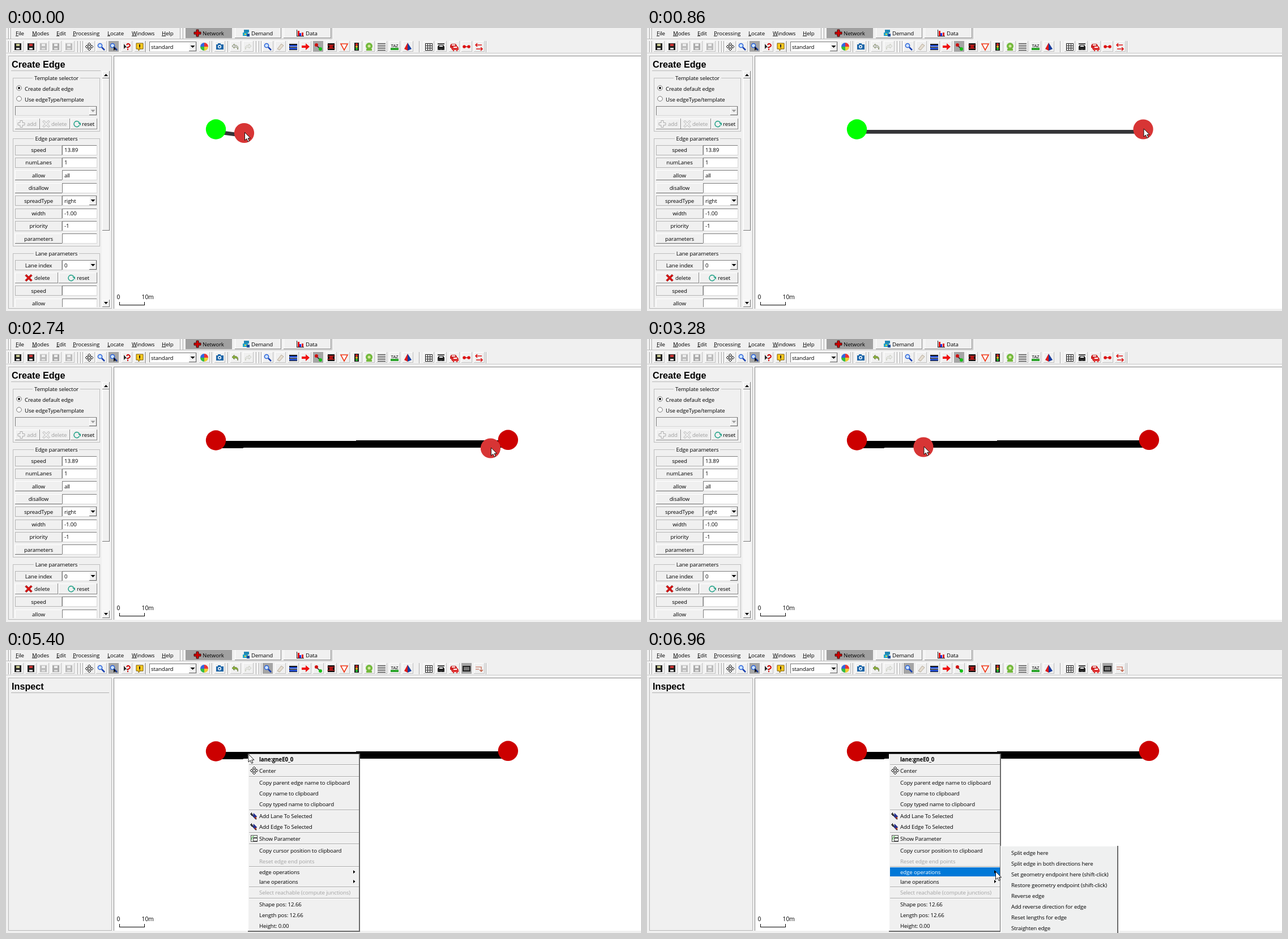
Write an HTML page that moves like this. It is 1121 px wide and 500 px high and loops after 8 s.

```html
<!DOCTYPE html>
<html lang="en">
<head>
<meta charset="utf-8">
<title>Network editor</title>
<style>
html, body { margin: 0; width: 100%; height: 100%; overflow: hidden; background: #f0f0f0; }
svg { display: block; width: 1121px; height: 500px; }
text { font: 9.7px "Open Sans", "Noto Sans", sans-serif; letter-spacing: -.13px; white-space: pre; }
.title { font: bold 16.2px "Liberation Sans", Arial, sans-serif; letter-spacing: 0; }
.bold { font-weight: 700; }
.scale { font-size: 10.3px; letter-spacing: 0; }
.key { text-decoration: underline; }
rect, .crisp { shape-rendering: crispEdges; }
</style>
</head>
<body>
<svg id="stage" viewBox="0 0 1121 500"></svg>
<script>
const LOOP = 8000, CLICK = 2420, INSPECT = 4380, PRESS = 5160, MENU = 5320, SUBMENU = 6340;
const START = [370.5, 179];

// ---- drawing helpers ----
const box = (x, y, w, h, fill, more = '') => `<rect x="${x}" y="${y}" width="${w}" height="${h}" fill="${fill}" ${more}/>`;
const path = (d, fill, stroke = 'none', sw = 1) => `<path d="${d}" fill="${fill}" stroke="${stroke}" stroke-width="${sw}"/>`;
const dot = (x, y, r, fill, more = '') => `<circle cx="${x}" cy="${y}" r="${r}" fill="${fill}" ${more}/>`;
const text = (x, y, s, fill = '#000', more = '') => `<text x="${x}" y="${y + 3.5}" fill="${fill}" ${more}>${s}</text>`;
const mid = (x, y, s, fill) => text(x, y, s, fill, 'text-anchor="middle"');
const at = (x, y, s) => `<g transform="translate(${x} ${y})">${s}</g>`;
const group = (id, s) => `<g id="${id}">${s}</g>`;

const raised = (x, y, w, h, edge = '#8a8a8a', fill = '#f0f0f0') =>
  box(x, y, w, h, edge) + box(x, y, w - 1, h - 1, '#fff') + box(x + 1, y + 1, w - 2, h - 2, fill);
const flat = (x, y, w, h) => box(x, y, w, h, '#b4b4b4') + box(x + 1, y + 1, w - 2, h - 2, '#f0f0f0');
const field = (x, y, w, h, fill = '#fff') =>
  box(x, y, w, h, '#d8d8d8') + box(x, y, w - 1, h - 1, '#7c7c7c') + box(x + 1, y + 1, w - 2, h - 2, fill);
const down = (x, y, fill = '#000') => path(`M${x - 4} ${y - 2}h8l-4 4z`, fill);
const combo = (x, y, w, h, off) => field(x, y, w, h, off ? '#f0f0f0' : '#fff') +
  raised(x + w - 14, y + 1, 13, h - 2, '#666') + down(x + w - 7.5, y + h / 2, off ? '#999' : '#000');
const vline = (x, y, h) => box(x, y, 1, h, '#a5a5a5') + box(x + 1, y, 1, h, '#fff');
const frame = (y, h, name, half) =>
  `<rect x="12.5" y="${y + .5}" width="153" height="${h}" fill="none" stroke="#bdbdbd"/>` +
  box(89 - half, y - 5, half * 2, 10, '#f0f0f0') + mid(89, y, name);

// ---- icons, centred on 0,0 ----
const floppy = (c, label) => box(-6, -6, 12, 12, c) + box(-3, -5, 6, 4, label) + box(-3, 2, 6, 3, '#ddd');
const lens = path('M1 1L6 6', 'none', '#1840b0', 2.5) + dot(-2, -2, 3.6, '#cfe6ff', 'stroke="#2860d8" stroke-width="1.5"');
const move = path('M0-7L3-4H1V-1H4V-3L7 0 4 3V1H1V4H3L0 7-3 4H-1V1H-4V3L-7 0-4-3V-1H-1V-4H-3z', '#fff', '#222', 1);
const plus = (c, line) => path('M-2-6H2V-2H6V2H2V6H-2V2H-6V-2H-2z', c, line);
const cross = (c, line) => path('M-6-4L-4-6 0-2 4-6 6-4 2 0 6 4 4 6 0 2-4 6-6 4-2 0z', c, line);
const cycle = path('M4.5-2A5 5 0 1 0 4.6 2', 'none', '#2aa58c', 1.6) + path('M2-2H7V3z', '#2aa58c');
const back = c => path('M-6-1L-2-5V-2.6C3-3 6 0 4 5 4 1 1 .4-2 .8V3z', c, '#5b6b3a', .7);
const car = c => path('M-6 4V0L-4-3H4L6 0V4H4V6H2V4H-2V6H-4V4z', c) + box(-3, -2, 6, 2, '#fff');
const sheet = c => box(-6, -6, 12, 2, c) + box(-6, 4, 12, 2, c);
const wand = path('M-5-4L5 6', 'none', '#222', 2) + path('M0-5L6 1 3 6-1 1z', '#26308f') + path('M-6-3H-1M-3.5-6V0', 'none', '#222') + box(2, 2, 3, 3, '#a33a1c');
const wheel = ['#e33', '#ec3', '#3b4', '#36d'].map((c, i) => `<path d="M0 0V-7A7 7 0 0 1 7 0z" fill="${c}" transform="rotate(${i * 90})"/>`).join('');
const swap = c => path('M-6-3H5M-3-6L-6-3-3 0M6 4H-5M3 1L6 4 3 7', 'none', c, 1.5);

const tools = [
  [21, floppy('#222', '#c8c890')], [44, floppy('#222', '#c33')],
  [66, floppy('#bbb', '#eee')], [88, floppy('#aaa', '#eee')], [111, floppy('#bbb', '#eee')],
  [147, move], [168, lens], [190, lens + path('M0-1V7L2 5 5 6z', '#111'), 1],
  [213, path('M-5-5V4L-2 1 1 2z', '#222') + path('M0-3Q2-7 5-4T2 1V3', 'none', '#c00', 2) + box(1, 4, 2, 2, '#c00')],
  [236, path('M-6-6H6V4H1L-2 7V4H-6z', '#ffcb1f', '#7a5a00') + box(-1, -4, 2, 5, '#222') + box(-1, 2, 2, 1, '#222')],
  [350, wheel],
  [377, box(-6, -4, 13, 9, '#1b65a8') + box(-3, -6, 5, 2, '#1b65a8') + dot(0, 0, 3, '#fff') + dot(0, 0, 1.6, '#1b65a8')],
  [484, path('M-5 4L2-5 6-2-1 6z', '#e5ddd0', '#b5aa9a')],
  [507, box(-7, -5, 14, 11, '#111') + box(-7, -3, 14, 3, '#2952d0') + box(-7, 2, 14, 3, '#2952d0') + path('M-6 .5H7', 'none', '#fff', .8)],
  [529, path('M-7-2H0V-6L7 0 0 6V2H-7z', '#f01010')],
  [574, box(-6, -6, 12, 12, '#111') + box(-3, -3, 6, 6, '#b01010') + path('M-7-3H7M-7 3H7', 'none', '#d33', 1)],
  [597, path('M-6-5H6L0 6z', '#fff', '#f03a1a', 1.6)],
  [619, box(-4, -7, 8, 14, '#222') + dot(0, -4, 2, '#e22') + dot(0, 0, 2, '#eb2') + dot(0, 4, 2, '#2c3')],
  [641, dot(0, -1, 6, '#72b93b') + dot(0, -1, 2.5, '#d5e8a0') + box(-5, 4, 10, 3, '#72b93b')],
  [663, [-6, -3, 0, 3, 6].map(y => box(-7, y, 14, 1, '#222')).join('')],
  [686, box(-7, 2, 14, 4, '#2da52d') + `<text y="1" text-anchor="middle" style="font-size:8px">TAZ</text>`],
  [709, path('M0-7L7 4 0 7z', '#173e9e') + path('M0-7L-6 4 0 7z', '#e01818')],
  [746, [-6, -2, 2, 6].map(v => box(-6, v, 13, 1, '#222') + box(v, -6, 1, 13, '#222')).join('')],
  [768, sheet('#444') + car('#222')], [791, at(-1, -2, car('#c22')) + at(2, 2, car('#d33'))],
];

const toolButton = ([x, icon, on]) =>
  (on ? box(x - 9, 23, 18, 19, '#a5a5a5') : raised(x - 9, 23, 19, 19, '#c0c0c0')) + at(x, 33, icon);

const menus = [[17, 'File'], [46, 'Modes'], [89, 'Edit'], [118, 'Processing'], [179, 'Locate'], [222, 'Windows'], [275, 'Help']];

function chrome() {
  const modes = box(317, 0, 82, 18, '#a0a0a0') + raised(404, -2, 82, 20) + raised(490, -2, 84, 20) +
    at(338, 9, plus('#d00000', '#3a0a0a')) + text(347, 9, 'Network') +
    at(424, 9, box(-4, -6, 9, 5, '#2187b5') + box(-6, -1, 9, 6, '#23a6c8') + box(1, 1, 5, 5, '#1c4f9c') + box(-3, 1, 3, 2, '#e8d040')) + text(433, 9, 'Demand') +
    at(519, 9, box(-6, -6, 1, 12, '#222') + box(-6, 5, 13, 1, '#222') + box(-4, -4, 3, 9, '#e01010') + box(-1, 0, 3, 5, '#1030e0') + box(3, -1, 3, 6, '#e01010')) + text(529, 9, 'Data');
  return box(0, 0, 1121, 500, '#f0f0f0') +
    box(0, 19, 575, 1, '#b8b8b8') + box(0, 20, 575, 1, '#fff') + box(0, 44, 1121, 1, '#c4c4c4') + box(0, 45, 1121, 1, '#fff') +
    [4, 8, 307, 312, 575].map(x => vline(x, 0, 19)).join('') +
    [4, 8, 126, 131, 135, 246, 363, 391, 441, 446, 450, 729, 847].map(x => vline(x, 23, 20)).join('') +
    menus.map(([x, s]) => text(x, 9, `<tspan class="key">${s[0]}</tspan>${s.slice(1)}`)).join('') + modes +
    tools.map(toolButton).join('') +
    combo(253, 24, 84, 18) + text(256, 33, 'standard') +
    raised(396, 23, 19, 19, '#c0c0c0') + raised(418, 23, 19, 19, '#c0c0c0') +
    group('undoOff', at(405, 33, back('#d8d8d8'))) + group('undoOn', at(405, 33, back('#8bb13a'))) +
    `<g transform="translate(427 33) scale(-1 1)" opacity=".35">${back('#ddd')}</g>` +
    box(190, 49, 931, 447, '#8a8a8a') + box(191, 50, 930, 446, '#fff') +
    `<rect x="4.5" y="49.5" width="182" height="446" fill="none" stroke="#b5b5b5"/>`;
}

const edgeIcon = path('M-4-3L4 4', 'none', '#222', 1.6) + dot(-3, -3, 3, '#d01010') + dot(4, 4, 3, '#18c018');

function row(y, name, value, kind) {
  const top = Math.round(y - 9);
  return (kind == 'button' ? raised(16, top, 84, 18, '#6c6c6c') : flat(16, top, 83, 18)) + mid(57.5, y, name) +
    (kind == 'combo' ? combo : field)(99, top, 62, 18) + text(103, y, value);
}

const edgeRows = [['speed', '13.89'], ['numLanes', '1'], ['allow', 'all', 'button'], ['disallow', '', 'button'],
  ['spreadType', 'right', 'combo'], ['width', '-1.00'], ['priority', '-1'], ['parameters', '', 'button']];
const radio = (y, on) => dot(23, y, 4.3, '#fff', 'stroke="#777"') + (on ? dot(23, y, 1.9, '#000') : '');

function createPanel() {
  return `<g clip-path="url(#panelClip)">` +
    text(10, 66.5, 'Create Edge', '#000', 'class="title"') + box(9, 75, 158, 1, '#b8b8b8') +
    frame(88, 94, 'Template selector', 42) + radio(106, 1) + text(33, 107, 'Create default edge') +
    radio(125) + text(33, 126, 'Use edgeType/template') + combo(16, 138, 145, 17, 1) +
    raised(16, 160, 44, 19) + at(27, 169.5, plus('#f4f4f4', '#aaa')) + text(37, 169.5, 'add', '#a0a0a0') +
    raised(60, 160, 53, 19) + at(71, 169.5, cross('#f4f4f4', '#aaa')) + text(80, 169.5, 'delete', '#a0a0a0') +
    raised(114, 160, 47, 19) + at(125, 169.5, cycle) + text(134, 169.5, 'reset') +
    frame(195, 190, 'Edge parameters', 40) + edgeRows.map((r, i) => row(215.5 + 22.4 * i, ...r)).join('') +
    frame(398, 130, 'Lane parameters', 40) + row(419, 'Lane index', '0', 'combo') +
    raised(16, 432, 76, 19) + at(40, 441.5, cross('#e01010', '#900')) + text(50, 441.5, 'delete') +
    raised(93, 432, 68, 19) + at(115, 441.5, cycle) + text(125, 441.5, 'reset') +
    row(464, 'speed', '') + row(486.5, 'allow', '', 'button') +
    box(169, 76, 14, 417, '#f7f7f7') + raised(170, 76, 13, 13, '#777') + raised(170, 89, 13, 269, '#777') + raised(170, 480, 13, 13, '#777') +
    path('M173 85h7l-3.5-4z', '#000') + path('M173 484h7l-3.5 4z', '#000') + '</g>' +
    toolButton([462, lens]) + toolButton([551, edgeIcon, 1]) +
    toolButton([813, path('M-5 0H5', 'none', '#c11', 1.5) + dot(-4, 0, 2.8, '#d11') + dot(4, 0, 2.8, '#d11')]) + toolButton([835, swap('#d11')]);
}

function inspectPanel() {
  return text(10, 66.5, 'Inspect', '#000', 'class="title"') + box(9, 75, 173, 1, '#b0b0b0') +
    toolButton([462, lens, 1]) + toolButton([551, edgeIcon]) +
    toolButton([813, box(-7, -5, 14, 10, '#222') + box(-5, -3, 10, 6, '#777'), 1]) +
    toolButton([835, path('M-6-3H4V5M1 2L4 5 7 2M-6 1H0', 'none', '#c0593f', 1.2)]);
}

// y, label, kind: '' live, 'off' greyed, 'info' not selectable, 'sub' opens a submenu
const items = [
  [193, 'lane:gneE0_0', 'info'], [213, 'Center', ''],
  [234, 'Copy parent edge name to clipboard', ''], [253, 'Copy name to clipboard', ''], [272, 'Copy typed name to clipboard', ''],
  [293, 'Add Lane To Selected', ''], [312, 'Add Edge To Selected', ''], [333, 'Show Parameter', ''],
  [354, 'Copy cursor position to clipboard', ''], [373, 'Reset edge end points', 'off'],
  [392, 'edge operations', 'sub'], [409, 'lane operations', 'sub'],
  [428, 'Select reachable (compute junctions)', 'off'],
  [449, 'Shape pos: 12.66', 'info'], [468, 'Length pos: 12.66', 'info'], [487, 'Height: 0.00', 'info'],
];
const subItems = ['Split edge here', 'Split edge in both directions here', 'Set geometry endpoint here (shift-click)',
  'Restore geometry endpoint (shift-click)', 'Reverse edge', 'Add reverse direction for edge', 'Reset lengths for edge', 'Straighten edge'];

function contextMenu() {
  return box(427, 183, 198, 315, '#696969') + box(427, 183, 196, 313, '#fff') + box(428, 184, 195, 312, '#f0f0f0') + box(427, 183, 197, 1, '#555') +
    [202, 223, 282, 322, 342, 382, 418, 438].map(y => box(429, y, 194, 1, '#a8a8a8') + box(429, y + 1, 194, 1, '#fff')).join('') +
    '<rect id="hot" x="429" width="194" fill="#0078d7"/>' +
    items.map(([y, s, kind], i) => text(447, y, s, kind == 'off' ? '#a3a3a3' : '#000', `id="item${i}"` + (i ? '' : ' class="bold"')) +
      (kind == 'sub' ? path(`M613 ${y - 3}v6l3.5-3z`, '#000') : '')).join('') +
    at(438, 213, move) + at(437, 293, wand) + at(437, 312, wand) +
    at(438, 333, box(-6, -6, 12, 12, '#555') + box(-5, -5, 10, 10, '#e8f4e8') + box(-2, -2, 8, 7, '#444') + box(-1, 0, 6, 4, '#fff') + path('M-5 2L-3-3 0-4', 'none', '#3a3'));
}

const subMenu = box(624, 346, 208, 160, '#696969') + box(624, 346, 206, 160, '#fff') + box(625, 347, 205, 160, '#eff0f0') +
  subItems.map((s, i) => text(643, 358 + 19.1 * i, s)).join('');

document.getElementById('stage').innerHTML =
  '<clipPath id="panelClip"><rect x="4" y="49" width="183" height="444"/></clipPath>' +
  '<clipPath id="viewClip"><rect x="191" y="50" width="930" height="446"/></clipPath>' +
  chrome() + group('create', createPanel()) + group('inspect', inspectPanel()) +
  text(195.5, 475.5, '0', '#000', 'class="scale"') + text(239.5, 475.5, '10m', '#000', 'class="scale"') +
  '<path class="crisp" d="M200.5 484V489.5H244.5V484" fill="none" stroke="#000"/>' +
  '<g clip-path="url(#viewClip)"><line id="draft" stroke="#343437" stroke-width="6.6"/>' +
  '<path id="lane" class="crisp" d="M371 180H618V179H886V192H419V193H371Z"/>' +
  dot(...START, 17.7, '#0f0', 'id="from"') + dot(886.3, 178.3, 17.7, '#c00', 'id="to"') +
  dot(0, 0, 17.6, '#d73535', 'id="ghost"') + '</g>' +
  group('menu', contextMenu()) + group('sub', subMenu) +
  dot(427, 184, 10, '#ff0', 'id="press" opacity=".47"') +
  '<path id="arrow" d="M0 0V14L3.3 11 5.6 16.2 7.9 15.2 5.7 10.2H10Z" fill="#fff" stroke="#000" stroke-width=".9"/>';

// ---- pointer motion: start, ms per step, steps, points on a smooth curve ----
const moves = [
  [80, 77, 8, [420.5, 185.5], [560, 193], [745, 196], [872.3, 187]],
  [780, 80, 5, [872.3, 187], [873, 184], [876, 179], [879, 178], [881, 177], [882.3, 176.7]],
  [1420, 80, 1, [882.3, 176.7], [882, 177.4]],
  [1560, 80, 3, [882, 177.4], [884.3, 181]],
  [2040, 80, 1, [884.3, 181], [885.3, 180]],
  [2200, 80, 1, [885.3, 180], [887, 178]],
  [2660, 77.5, 9, [887, 178], [820, 199.5], [610, 201], [488, 191]],
  [3600, 80, 7, [488, 191], [468, 168], [430, 115], [399, 56], [392, 27], [394, 42], [401, 97], [424, 126]],
  [4220, 80, 1, [424, 126], [425, 127]],
  [4540, 80, 5, [425, 127], [439, 152], [427, 185]],
  [5560, 75, 9, [427, 185], [504, 326], [592.5, 386], [611, 394]],
  [6420, 80, 1, [611, 394], [616, 395]],
  [6800, 80, 3, [616, 395], [614.5, 392.5]],
];

function curve(pts, u) {
  const last = pts.length - 1, i = Math.min(Math.floor(u * last), last - 1), s = u * last - i;
  const [a, b, c, d] = [-1, 0, 1, 2].map(k => pts[Math.max(0, Math.min(last, i + k))]);
  return [0, 1].map(j => .5 * (2 * b[j] + (c[j] - a[j]) * s + (2 * a[j] - 5 * b[j] + 4 * c[j] - d[j]) * s * s +
    (3 * b[j] - a[j] - 3 * c[j] + d[j]) * s * s * s));
}

function pointer(t) {
  const move = moves.filter(m => t >= m[0]).pop();
  if (!move) return moves[0][3];
  const [begin, step, count, ...pts] = move;
  return curve(pts, Math.min(count, Math.floor((t - begin) / step) + 1) / count);
}

const el = id => document.getElementById(id);
const set = (id, attrs) => { for (const k in attrs) el(id).setAttribute(k, attrs[k]); };
const show = (id, on) => { el(id).style.display = on ? '' : 'none'; };

function draw(t) {
  const [x, y] = pointer(t), made = t >= CLICK, inspect = t >= INSPECT;
  const dx = x - START[0], dy = y - START[1], k = 4.4 / Math.hypot(dx, dy);
  set('draft', { x1: START[0] - dy * k, y1: START[1] + dx * k, x2: x - dy * k, y2: y + dx * k });
  set('ghost', { cx: x, cy: y });
  set('from', { fill: made ? '#c00' : '#0f0' });
  set('arrow', { transform: `translate(${x + 1} ${y - 1})` });
  show('draft', !made);
  for (const id of ['lane', 'to', 'undoOn']) show(id, made);
  show('undoOff', !made);
  show('create', !inspect);
  show('inspect', inspect);
  show('ghost', !inspect && y > 50);
  show('press', t >= PRESS && t < MENU);
  show('menu', t >= MENU);
  show('sub', t >= SUBMENU);

  const half = i => items[i][2] == 'sub' ? 8.5 : 9.5;
  const hot = items.findIndex(([cy, , kind], i) => (kind == '' || kind == 'sub') && Math.abs(y - 1 - cy) < half(i));
  items.forEach(([, , kind], i) => set('item' + i, { fill: i == hot ? '#fff' : kind == 'off' ? '#a3a3a3' : '#000' }));
  show('hot', hot >= 0);
  if (hot >= 0) set('hot', { y: Math.round(items[hot][0] - half(hot) + .5), height: Math.round(half(hot) * 2 - 1) });
}

function tick() {
  draw(performance.now() % LOOP);
  requestAnimationFrame(tick);
}
tick();
</script>
</body>
</html>
```
